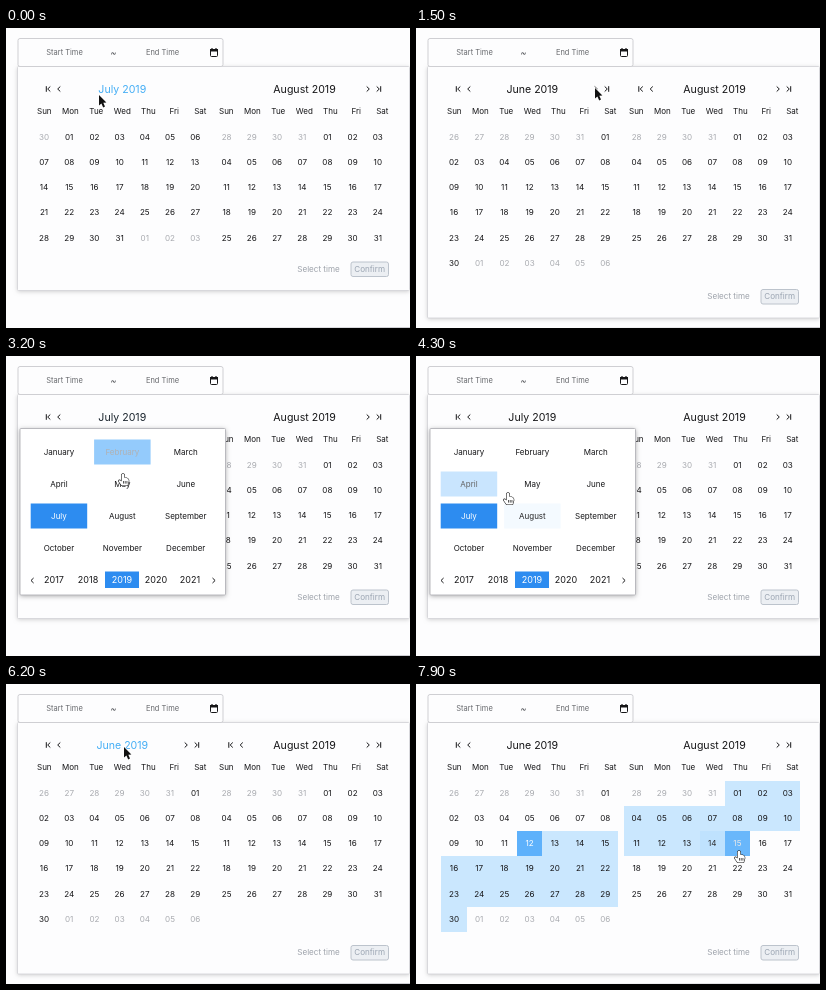
Recreate the animation shown at these times as an HTML page with a canvas. Size 404 px wide and 300 px high, loop 8 s.

```html
<!DOCTYPE html>
<html lang="en">
<head>
<meta charset="utf-8">
<title>Date range picker</title>
<style>
  html, body { margin: 0; width: 100%; height: 100%; overflow: hidden; background: #fdfdfe; }
  canvas { display: block; width: 404px; height: 300px; }
</style>
</head>
<body>
<canvas></canvas>
<script>
const canvas = document.querySelector('canvas');
const ctx = canvas.getContext('2d');
const ratio = window.devicePixelRatio || 1;
canvas.width = 404 * ratio;
canvas.height = 300 * ratio;

const LOOP = 8000, FADE = 300, SAMPLES = 30, HOVER_LAG = 120;
const CELL = 25.2, GRID_TOP = 96.5, GRID_LEFT = [25.4, 208];
const MONTHS = ['January', 'February', 'March', 'April', 'May', 'June', 'July',
  'August', 'September', 'October', 'November', 'December'];
const DAYS = ['Sun', 'Mon', 'Tue', 'Wed', 'Thu', 'Fri', 'Sat'];

const INK = [22, 22, 24], WHITE = [255, 255, 255], PAGE = [253, 253, 254];
const TITLE_BLUE = [69, 174, 245], HOVER = [94, 177, 251];
const SELECTED = [45, 140, 240], RANGE = [202, 231, 254];
const MUTED = '#a9abb0';

const CLICK = { previous: 700, next: 1800, open: 2500, june: 4900, close: 6100, start: 6980 };

const TITLE = [118, 63];
const MOVES = [
  { at: 0, time: 500, to: [51, 60] },
  { at: 750, time: 400, to: [179, 60] },
  { at: 1800, time: 400, to: TITLE },
  { at: 2700, time: 500, to: [117, 118] },
  { at: 3200, time: 550, to: [105, 156] },
  { at: 3750, time: 170, to: [84.6, 147] },
  { at: 3920, time: 260, to: [83, 142] },
  { at: 4180, time: 120, to: [92, 137] },
  { at: 4350, time: 400, to: [176, 129] },
  { at: 5200, time: 700, to: TITLE },
  { at: 6250, time: 430, to: [117, 149] },
  { at: 7100, time: 500, to: [323, 167] },
];

const HAND = new Path2D('M-1.4 7.4V.8Q0-1.4 1.4.8V3.8Q5.9 3.9 5.8 7L4.6 11.4H-1.4L-4.4 7.2Q-4-.1-1.4 7.4Z'
  .replace('Q-4-.1', 'Q-3.8 5'));
const ARROW = new Path2D('M0 0V10.6L2.4 8.4 4.2 12.4 6 11.6 4.3 7.8 7.4 7.6Z');

const clamp = (v, lo = 0, hi = 1) => Math.min(hi, Math.max(lo, v));
const smooth = k => k * k * (3 - 2 * k);
const mix = (a, b, k) => a.map((v, i) => v + (b[i] - v) * k);
const css = c => typeof c === 'string' ? c : `rgb(${c.map(Math.round)})`;

const pointer = t => MOVES.reduce(
  (from, { at, time, to }) => mix(from, to, smooth(clamp((t - at) / time))), [93, 67]);

const popupOpen = t => t >= CLICK.open && t < CLICK.close;
const leftMonth = t => (t >= CLICK.previous && t < CLICK.next) || t >= CLICK.june ? 6 : 7;
const monthBox = i => [24.7 + (i % 3) * 63.4, 83.6 + Math.floor(i / 3) * 32, 56.5, 24.8];

function monthDays(month) {
  const first = new Date(2019, month - 1, 1).getDay();
  const count = new Date(2019, month, 0).getDate();
  const rows = Math.ceil((first + count) / 7);
  return Array.from({ length: rows * 7 }, (_, i) => {
    const date = new Date(2019, month - 1, 1 - first + i);
    const inside = date.getMonth() === month - 1;
    return { day: date.getDate(), id: inside ? month * 100 + date.getDate() : 0 };
  });
}
const CALENDAR = { 6: monthDays(6), 7: monthDays(7), 8: monthDays(8) };

function hovered(t, x, y) {
  if (x > 88 && x < 144 && y > 54 && y < 70) return 'title';
  if (popupOpen(t)) {
    return MONTHS.find((_, i) => {
      const [bx, by, w, h] = monthBox(i);
      return x > bx - 3 && x < bx + w + 3 && y > by - 3 && y < by + h + 3;
    });
  }
  if (y < GRID_TOP) return null;
  const side = x < 205 ? 0 : 1;
  const col = clamp(Math.floor((x - GRID_LEFT[side]) / CELL), 0, 6);
  const row = Math.floor((y - GRID_TOP) / CELL);
  return CALENDAR[side ? 8 : leftMonth(t)][row * 7 + col]?.id;
}

function stateAt(t) {
  const hover = hovered(t, ...pointer(t - HOVER_LAG));
  const started = t >= CLICK.start;
  // Until the pointer leaves the first day, the range is open-ended.
  const end = !started ? 0 : t < 7230 ? Infinity : hover;
  return { hover, end, month: leftMonth(t), start: started ? 612 : 0 };
}

function text(str, x, y, size, color = INK) {
  ctx.font = `${size}px Inter, sans-serif`;
  ctx.textAlign = 'center';
  ctx.fillStyle = css(color);
  ctx.fillText(str, x, y + size * 0.364);
}

function box(x, y, w, h, fill, stroke, radius = 0) {
  ctx.beginPath();
  ctx.roundRect(x, y, w, h, radius);
  if (fill) { ctx.fillStyle = css(fill); ctx.fill(); }
  if (stroke) { ctx.strokeStyle = stroke; ctx.lineWidth = 1; ctx.stroke(); }
}

function shadowBox(x, y, w, h, fill, stroke, shadow, blur) {
  ctx.save();
  ctx.shadowColor = shadow;
  ctx.shadowBlur = blur * ratio;
  ctx.shadowOffsetY = ratio;
  box(x, y, w, h, fill, null, 1);
  ctx.restore();
  box(x, y, w, h, null, stroke, 1);
}

// dir: -1 points left, 1 points right
function chevron(x, y, dir, bar) {
  ctx.beginPath();
  ctx.moveTo(x - dir * 1.3, y - 2.5);
  ctx.lineTo(x + dir * 1.3, y);
  ctx.lineTo(x - dir * 1.3, y + 2.5);
  if (bar) {
    ctx.moveTo(x + dir * 2.7, y - 2.8);
    ctx.lineTo(x + dir * 2.7, y + 2.8);
  }
  ctx.strokeStyle = css(INK);
  ctx.lineWidth = 1;
  ctx.stroke();
}

function drawInput() {
  box(12, 10.5, 205, 28, PAGE, '#cfcfd3', 2);
  text('Start Time', 58.5, 24.5, 7.5, '#66686c');
  text('~', 107.5, 24.5, 9, '#55575b');
  text('End Time', 156.5, 24.5, 7.5, '#66686c');
  box(204.5, 21.5, 7, 7, null, css(INK), 1);
  box(204, 21, 8, 2.5, INK);
  box(205.4, 20, 1.2, 1.5, INK);
  box(209.4, 20, 1.2, 1.5, INK);
}

function drawGrid(side, month, share) {
  DAYS.forEach((name, i) => text(name, (side ? 220.3 : 38.3) + i * 26, 83.3, 8));
  CALENDAR[month].forEach(({ day, id }, i) => {
    const x = GRID_LEFT[side] + (i % 7) * CELL;
    const y = GRID_TOP + Math.floor(i / 7) * CELL;
    let color = MUTED;
    if (id) {
      const inRange = share(s => id > s.start && id <= s.end);
      const active = share(s => s.hover === id || s.start === id);
      if (inRange || active) {
        const left = Math.round(x), top = Math.round(y);
        box(left, top, Math.round(x + CELL) - left, Math.round(y + CELL) - top,
          mix(mix(PAGE, RANGE, inRange), HOVER, active));
      }
      color = mix(INK, WHITE, active);
    }
    text(String(day).padStart(2, '0'), x + CELL / 2, y + CELL / 2 - 0.2, 8.1, color);
  });
}

function drawPanel(t, share) {
  const month = leftMonth(t);
  const bottom = month === 6 ? 290 : 262.5;
  shadowBox(11.5, 38.5, 392, bottom - 38.5, PAGE, '#d8d8dc', 'rgba(0,0,0,.2)', 4);

  text(`${MONTHS[month - 1]} 2019`, 116.3, 61, 10.6, mix(INK, TITLE_BLUE, share(s => s.hover === 'title')));
  text('August 2019', 298.5, 61, 10.6);
  const arrows = (x, dir, far) => {
    chevron(x, 61, dir);
    chevron(x + far, 61, dir, true);
  };
  arrows(53, -1, -10);
  arrows(362, 1, 10);
  if (month === 6 && t < 7200) {
    arrows(180, 1, 10);
    arrows(235.5, -1, -10);
  }

  drawGrid(0, month, share);
  drawGrid(1, 8, share);

  const footer = bottom - 21.5;
  text('Select time', 312.5, footer, 8.1, '#9da2aa');
  box(345, footer - 7, 37.5, 14.5, '#eceff3', '#bcc3cc', 2);
  text('Confirm', 363.7, footer, 8.1, '#9ba5b2');
}

function drawMonthPopup(t, share) {
  const alpha = Math.min(clamp((t - 2450) / 200), clamp((6200 - t) / 150));
  if (!alpha) return;
  ctx.save();
  ctx.globalAlpha = alpha;
  shadowBox(14, 72.5, 205.5, 166.5, WHITE, '#b9b9be', 'rgba(0,0,0,.35)', 5);
  MONTHS.forEach((name, i) => {
    const [x, y, w, h] = monthBox(i);
    const chosen = share(s => s.month === i + 1);
    const hover = share(s => s.hover === name);
    if (chosen || hover) box(x, y, w, h, mix(mix(WHITE, HOVER, hover), SELECTED, chosen));
    text(name, x + w / 2, y + 12.5, 8, mix(INK, WHITE, Math.max(chosen, hover)));
  });
  box(99, 215.5, 34, 16.5, SELECTED);
  for (let i = 0; i < 5; i++) text(2017 + i, 48 + i * 34, 224, 9, i === 2 ? WHITE : INK);
  chevron(26.3, 224.5, -1);
  chevron(207.8, 224.5, 1);
  ctx.restore();
}

function drawPointer(t) {
  const [x, y] = pointer(t);
  const hand = y > (popupOpen(t) ? 73 : GRID_TOP);
  const shape = hand ? HAND : ARROW;
  ctx.save();
  ctx.translate(x, y);
  ctx.lineJoin = 'round';
  ctx.lineWidth = hand ? 1.1 : 1.6;
  ctx.strokeStyle = hand ? '#111' : '#fff';
  ctx.fillStyle = hand ? '#fff' : '#111';
  ctx.stroke(shape);
  ctx.fill(shape);
  if (hand) {
    ctx.fillStyle = '#111';
    for (let i = 0; i < 3; i++) ctx.fillRect(i * 1.8, 7, 0.7, 2.6);
  }
  ctx.restore();
}

function draw(t) {
  // Fades follow the share of the recent past in which a state held.
  const recent = Array.from({ length: SAMPLES }, (_, i) => stateAt(Math.max(0, t - i * FADE / SAMPLES)));
  const share = test => recent.filter(test).length / SAMPLES;

  ctx.setTransform(ratio, 0, 0, ratio, 0, 0);
  box(0, 0, 404, 300, PAGE);
  const edge = ctx.createLinearGradient(150, 0, 404, 0);
  edge.addColorStop(0, 'rgba(205,205,210,0)');
  edge.addColorStop(1, 'rgba(205,205,210,1)');
  ctx.fillStyle = edge;
  ctx.fillRect(150, 299, 254, 1);

  drawPanel(t, share);
  drawInput();
  drawMonthPopup(t, share);
  drawPointer(t);
}

const begin = performance.now();
function tick() {
  draw((performance.now() - begin) % LOOP);
  requestAnimationFrame(tick);
}
tick();
</script>
</body>
</html>
```
